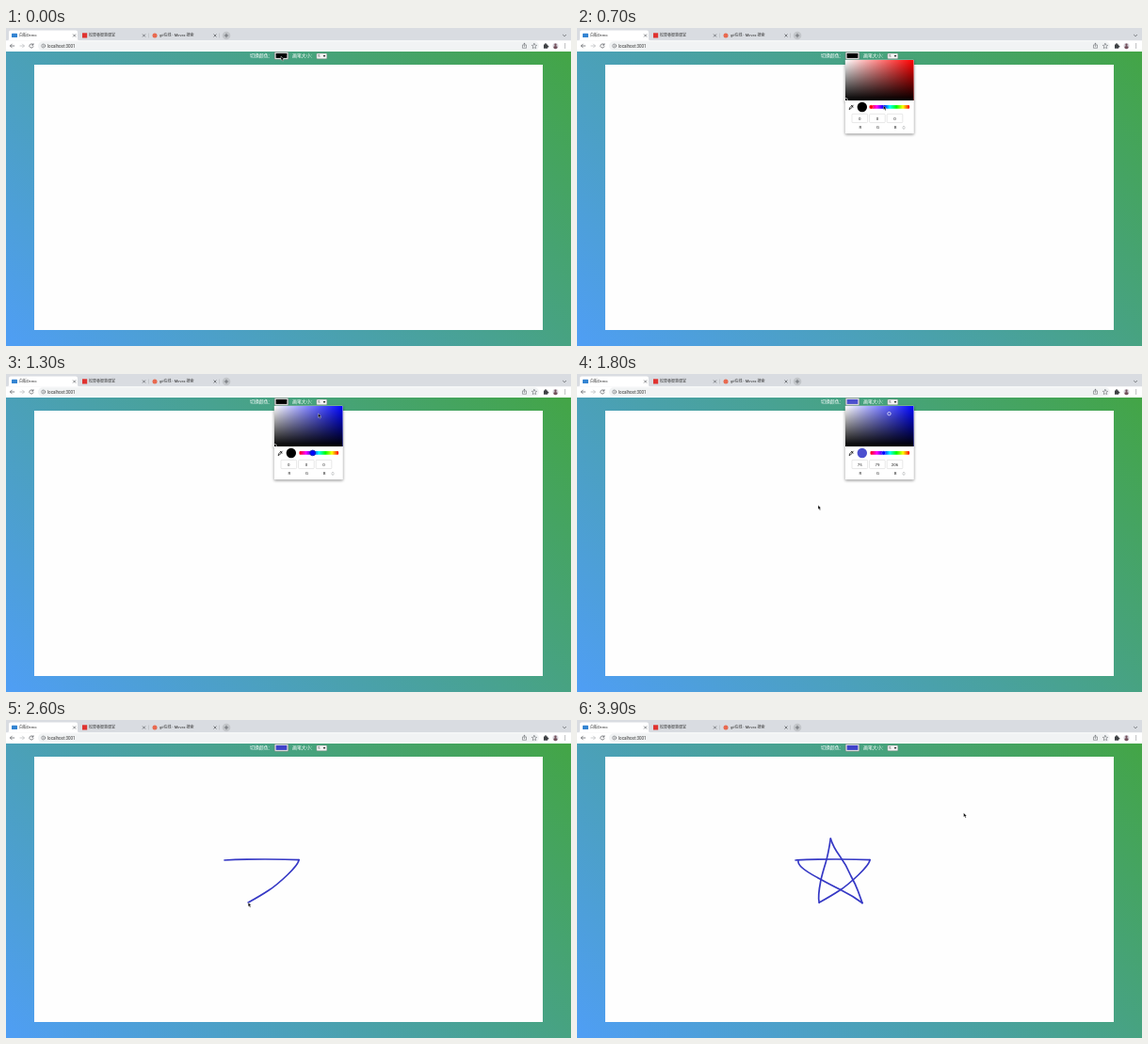
These frames come from a looping animation (600x338 px, 4000 ms). An HTML page:

```html
<!DOCTYPE html>
<html lang="zh">
<head>
<meta charset="utf-8">
<title>白板Demo</title>
<style>
  html, body { margin: 0; width: 100%; height: 100%; overflow: hidden; background: #fff; }
  .page { position: absolute; inset: 25px 0 0; background: linear-gradient(45deg, #4f9ef5, #43a546); }
  svg { position: absolute; left: 0; top: 0; width: 600px; height: 338px; }
  text { font: 4px Roboto, "Noto Sans CJK SC", "Noto Sans CJK", sans-serif; fill: #333; }
  .label { font-size: 4.9px; fill: #fff; }
  .value text { font-size: 4.4px; fill: #222; text-anchor: middle; }
  .line { fill: none; stroke: #55585c; stroke-width: .7; stroke-linecap: round; stroke-linejoin: round; }
  #ink path { fill: none; stroke: #3538c5; stroke-width: 1.7; stroke-linecap: round; stroke-linejoin: round; }
  #picker { filter: drop-shadow(0 1px 1.5px #0007); }
</style>
</head>
<body>
<div class="page"></div>
<svg viewBox="0 0 600 338">
  <defs>
    <linearGradient id="white"><stop stop-color="#fff"/><stop offset="1" stop-color="#fff" stop-opacity="0"/></linearGradient>
    <linearGradient id="black" x2="0" y2="1"><stop stop-opacity="0"/><stop offset="1"/></linearGradient>
    <linearGradient id="hues"></linearGradient>
  </defs>

  <!-- tab strip -->
  <path d="M0 0H600V13.5H0z" fill="#d9dce1"/>
  <path d="M1 13.5Q3 13.5 3 11.5V4.5Q3 2.5 5 2.5H74Q76 2.5 76 4.5V11.5Q76 13.5 78 13.5z" fill="#fff"/>
  <rect x="6" y="5.7" width="6" height="4.3" rx=".6" fill="#3484d2"/>
  <rect x="81" y="5.3" width="5.2" height="5.2" fill="#e0322f"/>
  <circle cx="158" cy="8" r="2.5" fill="#e8694f"/>
  <text x="14" y="9.4">白板Demo</text>
  <text x="88" y="9.4">松果巷智慧课堂</text>
  <text x="163" y="9.4">gif在线 - Mirvex 搜索</text>
  <path class="line" d="M71.4 6.8l2.4 2.4m0-2.4l-2.4 2.4M145.3 6.8l2.4 2.4m0-2.4l-2.4 2.4M220.8 6.8l2.4 2.4m0-2.4l-2.4 2.4M591.5 7.3l1.6 1.5 1.6-1.5"/>
  <path d="M151.5 5.5v5M226.5 5.5v5" stroke="#a6a9ad" stroke-width=".4"/>
  <circle cx="234" cy="8" r="4.3" fill="#c3c6ca"/>
  <path class="line" d="M232.2 8h3.6M234 6.2v3.6"/>

  <!-- toolbar -->
  <path d="M0 13.5H600V25H0z" fill="#fff"/>
  <rect x="34" y="14.3" width="532" height="9.4" rx="4.7" fill="#f1f3f4"/>
  <path class="line" d="M8.8 19H4.4m1.9-1.9L4.4 19l1.9 1.9M28.6 17.6a2.1 2.1 0 1 0 .4 2.1M29 16.6v1.5h-1.5"/>
  <path class="line" d="M15 19h4.4m-1.9-1.9l1.9 1.9-1.9 1.9" style="stroke:#b5b8bb"/>
  <circle class="line" cx="39.7" cy="19" r="2" style="stroke-width:.5"/>
  <path class="line" d="M39.7 18.9v1M39.7 18v.01" style="stroke-width:.5"/>
  <text x="44" y="20.5" style="font-size:4.5px">localhost:3001</text>
  <path class="line" d="M549.5 18h-1v3.3h4V18h-1M550.5 19.8v-3.6m-1 1l1-1 1 1" style="stroke-width:.5"/>
  <path class="line" d="M561 16.5l.8 1.7 1.9.2-1.4 1.3.4 1.9-1.7-.9-1.7.9.4-1.9-1.4-1.3 1.9-.2z" style="stroke-width:.5"/>
  <path d="M571 17.5h1.2a.9.9 0 1 1 1.7 0h1.3v1.3a.9.9 0 1 1 0 1.7v1.2H571z" fill="#3f4245"/>
  <circle cx="583.5" cy="19" r="3" fill="#d9d4dc"/>
  <path d="M581.3 21a2.2 2 0 0 1 4.4 0 3 3 0 0 1-4.4 0M582.3 17.8a1.2 1.2 0 1 0 2.4 0 1.2 1.2 0 1 0-2.4 0" fill="#73525c"/>
  <path d="M593.7 17v.01M593.7 19v.01M593.7 21v.01" class="line" style="stroke-width:1"/>

  <!-- page -->
  <text class="label" x="259" y="31.4">切换颜色：</text>
  <text class="label" x="304" y="31.4">画笔大小：</text>
  <rect x="285.2" y="25.6" width="14.6" height="7.6" rx=".8" fill="#efefef" stroke="#666" stroke-width=".5"/>
  <rect id="swatch" x="286.6" y="26.9" width="11.8" height="5"/>
  <rect x="329.8" y="27" width="11" height="5.8" rx=".8" fill="#f5f5f5" stroke="#767676" stroke-width=".4"/>
  <text x="331.3" y="31.4">5</text>
  <path d="M336.6 29.1h2.8l-1.4 1.8z" fill="#222"/>
  <path d="M30 39H570V321H30z" fill="#fefefe"/>
  <g id="ink"></g>

  <!-- colour picker -->
  <g id="picker">
    <rect x="284.8" y="33.8" width="73" height="78.4" rx=".8" fill="#fff"/>
    <rect id="base" x="285" y="34" width="72.5" height="43"/>
    <path d="M285 34h72.5v43H285z" fill="url(#white)"/>
    <path d="M285 34h72.5v43H285z" fill="url(#black)"/>
    <circle id="spot" r="1.7" fill="none" stroke="#fff" stroke-width=".7"/>
    <path class="line" d="M289.2 86.2l.4-1.4 2.1-2.1 1 1-2.1 2.1zM291.3 82.2l1.9 1.9M292.4 83l.9-.9" style="stroke:#111;stroke-width:.8"/>
    <circle id="preview" cx="302.8" cy="84" r="5.2"/>
    <rect x="311.5" y="82.1" width="41.6" height="3.6" rx="1" fill="url(#hues)"/>
    <circle id="thumb" cy="83.9"/>
    <g id="fields" class="value"></g>
    <path class="line" d="M346.2 105.2l.8-.8.8.8M346.2 106.6l.8.8.8-.8" style="stroke-width:.5"/>
  </g>
  <path id="cursor" d="M0 0V4.3l1-.9.8 1.8.9-.4-.8-1.7h1.3z" fill="#000" stroke="#fff" stroke-width=".35"/>
</svg>
<script>
const $ = id => document.getElementById(id);
const set = (id, attrs) => Object.entries(attrs).forEach(([k, v]) => $(id).setAttribute(k, v));
const clamp = x => Math.max(0, Math.min(1, x));
const ease = x => x * x * (3 - 2 * x);

$('hues').innerHTML = Array.from({ length: 7 }, (_, i) =>
  `<stop offset="${i / 6}" stop-color="hsl(${360 - i * 60} 100% 50%)"/>`).join('');
$('fields').innerHTML = [...'RGB'].map((name, i) => {
  const x = 300.3 + i * 18.6;
  return `<rect x="${x - 8.3}" y="91.4" width="16.6" height="9.2" rx=".8" fill="#fff" stroke="#d0d0d0" stroke-width=".5"/>
    <text class="number" x="${x}" y="97.6"></text><text x="${x + .6}" y="107.4">${name}</text>`;
}).join('');
const numbers = document.querySelectorAll('.number');

// Pen strokes: start, end, path
const LAG = 60;
const strokes = [
  [2080, 2290, 'M232 149Q250 148 275 148T311 148.6'],
  [2310, 2540, 'M311 148.6Q311 153 299 164.5T279 181Q270 187 257.2 194'],
  [2620, 2820, 'M257.2 194Q255.5 188 258.8 171Q260 165 264 152Q267 142 269.3 126'],
  [2840, 3010, 'M269.3 126Q272 135 279 144.5T291 166Q296 175 298.5 182T303 194.5'],
  [3030, 3670, 'M303 194.5Q293 187 280 180.5T259 169.5Q243 161 238.5 156.5Q234.5 152.5 235 149.8']
].map(([from, to, d]) => {
  const path = document.createElementNS('http://www.w3.org/2000/svg', 'path');
  path.setAttribute('d', d);
  $('ink').append(path);
  return { from, to, path, length: path.getTotalLength() };
});
const progress = (s, t) => clamp((t - s.from) / (s.to - s.from));

// Free pointer moves: time, x, y
const moves = [
  [0, 292, 30], [200, 292, 30.5], [500, 314, 82.5], [700, 325.5, 82.5], [950, 325.5, 82.5],
  [1300, 331.5, 42], [1500, 331.5, 42], [1800, 256, 139.5], [1900, 254, 141], [2080, 232, 149],
  [3670, 235, 149.8], [3900, 410.6, 98.8]
];

function pointer(t) {
  const drawing = strokes.findLast(s => t >= s.from);
  if (drawing && t <= 3670) {
    const { x, y } = drawing.path.getPointAtLength(drawing.length * progress(drawing, t));
    return [x, y];
  }
  const i = moves.findLastIndex(m => m[0] <= t);
  const a = moves[i], b = moves[i + 1] || a;
  const k = ease(clamp((t - a[0]) / (b[0] - a[0] || 1)));
  return [a[1] + (b[1] - a[1]) * k, a[2] + (b[2] - a[2]) * k];
}

function render(t) {
  const blue = t >= 800, chosen = t >= 1400;
  const rgb = chosen ? [75, 79, 206] : [0, 0, 0];
  const color = t >= 1900 ? '#3f42c9' : `rgb(${rgb})`;
  const hue = blue ? '#0006ff' : '#f00';
  const focused = blue && !chosen;
  set('picker', { visibility: t >= 100 && t < 1900 ? 'visible' : 'hidden' });
  set('swatch', { fill: color });
  set('preview', { fill: color });
  set('base', { fill: hue });
  set('spot', { cx: chosen ? 331.5 : 285.6, cy: chosen ? 42.2 : 76.3 });
  set('thumb', {
    cx: blue ? 325.7 : 312.3, r: focused ? 2.9 : 2.1, fill: hue,
    stroke: focused ? '#1a2a9c' : '#fff', 'stroke-width': focused ? .8 : .3
  });
  numbers.forEach((n, i) => n.textContent = rgb[i]);
  for (const s of strokes) {
    const p = progress(s, t - LAG);
    s.path.style.visibility = p ? 'visible' : 'hidden';
    s.path.style.strokeDasharray = `${s.length * p} 999`;
  }
  set('cursor', { transform: `translate(${pointer(t)})` });
}

function loop() {
  render(Math.floor(performance.now() % 4000 / 100) * 100);
  requestAnimationFrame(loop);
}
loop();
</script>
</body>
</html>
```
